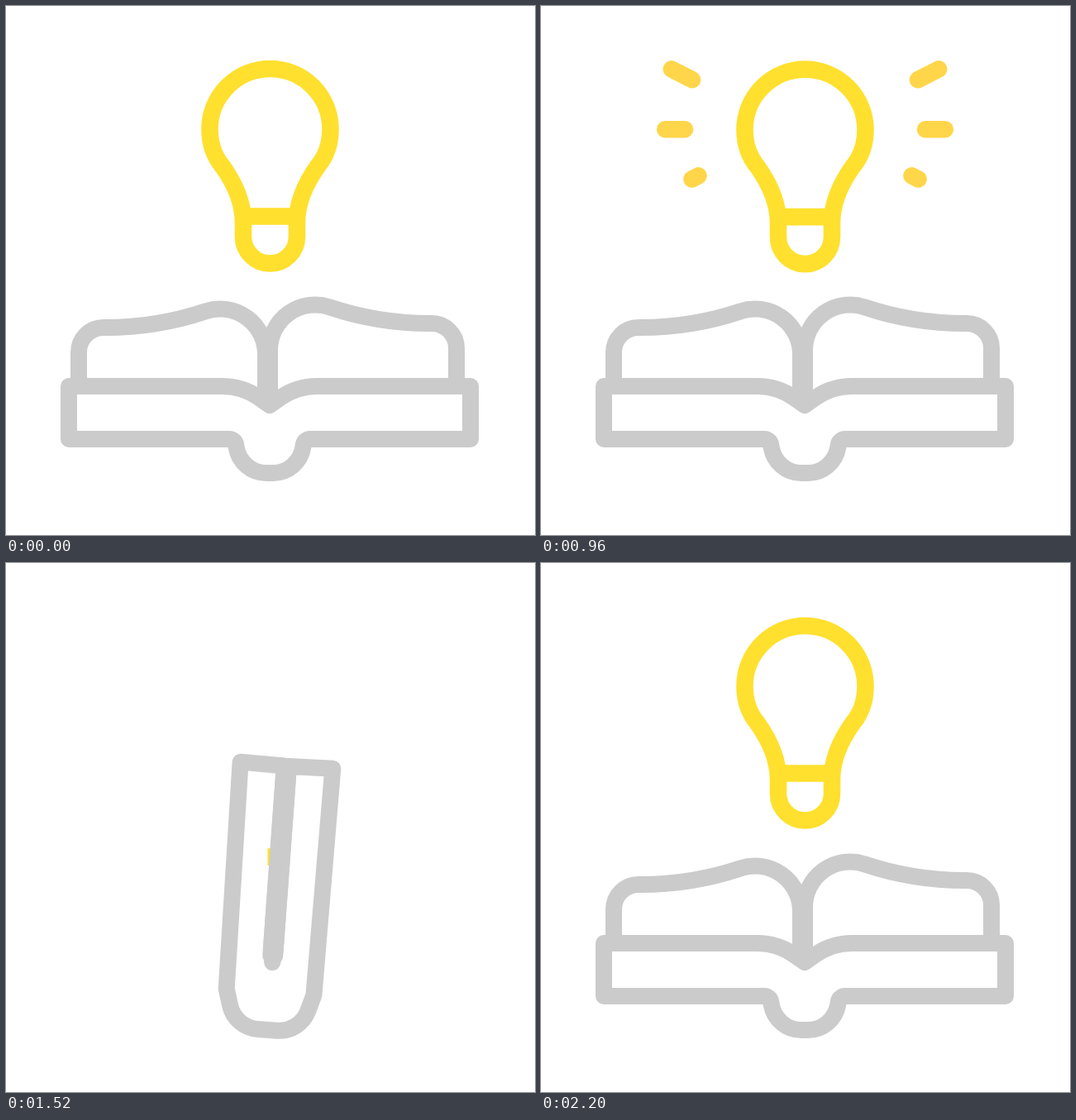
These frames come from a looping animation (640 by 640 pixels, 2.4 s). An HTML page with a canvas:

```html
<!DOCTYPE html>
<html lang="en">
<head>
<meta charset="utf-8">
<title>Idea book</title>
<style>
html, body { margin: 0; width: 100%; height: 100%; overflow: hidden; background: #fff; }
canvas { display: block; width: 640px; height: 640px; }
</style>
</head>
<body>
<canvas id="stage" width="640" height="640"></canvas>
<script>
const ctx = document.getElementById('stage').getContext('2d');
const GREY = '#cbcbcb', YELLOW = '#ffe02e', AMBER = '#ffd64a';
const LOOP = 2400, STEP = 40, LAST = 2200;
const MID = 319.5, SPINE_X = 319, SPINE_Y = 527;
const HALF = 0.25;

const clamp = v => Math.max(0, Math.min(1, v));
const lerp = (a, b, k) => a + (b - a) * k;
const span = (t, from, to) => (t - from) / (to - from);
const ease = v => (1 - Math.cos(Math.PI * clamp(v))) / 2;
const rad = deg => deg * Math.PI / 180;

// Right half of the cover, relative to the spine: open, half open, closed, corner radius.
const coverHalf = [
  [[33, -67], [31, -64], [2.4, -57], 77],
  [[243, -67], [220, -157.5], [2.6, -282], 0],
  [[243, -3], [246.5, -98], [56, -283], 0],
  [[42, -3], [41, 0], [53, -8], 8],
  [[35, 38], [37, 38], [39.5, 38], 37]
];

// Polyline of [x, y, radius] with rounded corners.
function rounded(pts) {
  const path = new Path2D();
  path.moveTo(pts[0][0], pts[0][1]);
  for (let i = 1; i < pts.length - 1; i++) {
    const [x, y, r] = pts[i];
    if (r) path.arcTo(x, y, pts[i + 1][0], pts[i + 1][1], r);
    else path.lineTo(x, y);
  }
  const end = pts[pts.length - 1];
  path.lineTo(end[0], end[1]);
  return path;
}

// Blend two points by angle and distance around the hinge.
function swing([x0, y0], [x1, y1], k) {
  const hinge = -27;
  const a = lerp(Math.atan2(y0 - hinge, x0), Math.atan2(y1 - hinge, x1), k);
  const r = lerp(Math.hypot(x0, y0 - hinge), Math.hypot(x1, y1 - hinge), k);
  return [r * Math.cos(a), hinge + r * Math.sin(a)];
}

function coverPath(lift) {
  const half = coverHalf.map(([open, mid, shut, r]) => {
    const [x, y] = lift < HALF ? swing(open, mid, lift / HALF) : swing(mid, shut, span(lift, HALF, 1));
    return [x, y, r];
  });
  const place = side => half.map(([x, y, r]) => [SPINE_X + side * x, SPINE_Y + y, r]);
  const valley = [SPINE_X, SPINE_Y - 44, 0];
  const path = rounded([valley, ...place(1), ...place(-1).reverse(), valley]);
  path.closePath();
  return path;
}

// A page turns rigidly with the cover and flattens as the book shuts.
function page(side, lift) {
  const extra = side > 0 ? 5 : 0;
  const flat = 1 - clamp(span(lift, HALF, 1));
  const a = rad(90 * lift), c = Math.cos(a), s = Math.sin(a);
  const x0 = 316.5 + 2.5 * lift + side * 2.5;
  const outline = [[226, 15, 0], [226, 86 + extra, 30], [131, 86 + extra, 380], [0, 130 + extra, 55], [0, 0, 0]];
  return outline.map(([x, h, r]) => [
    x0 + side * (x * c - h * flat * s),
    475 - (h * flat * c + x * s),
    r * flat
  ]);
}

function bulbTilt(t) {
  const max = 22.06;
  if (t < 285) return max * ease(t / 285);
  if (t < 571) return lerp(max, -max, ease(span(t, 285, 571)));
  return -max * (1 - ease(span(t, 571, 768)));
}

function bulbDrop(t) {
  return 279.5 * (ease(span(t, 948, 1348)) - ease(span(t, 1680, 2200)));
}

const bulb = new Path2D(
  'M287 279V262C287 240 279 218 262 194C251 181 246.5 166 246.5 149' +
  'A73 73 0 0 1 392.5 149C392.5 166 388 181 377 194C360 218 352 240 352 262V279' +
  'A32.5 32.5 0 0 1 287 279ZM287 254.5H352');

function drawBulb(t, left, right) {
  ctx.save();
  ctx.clip(rounded([...left, ...[...right].reverse(), [right[0][0], -10, 0], [left[0][0], -10, 0]]));
  ctx.translate(MID, 322 + bulbDrop(t));
  ctx.rotate(rad(bulbTilt(t)));
  ctx.translate(-MID, -322);
  ctx.lineWidth = 20.6;
  ctx.strokeStyle = YELLOW;
  ctx.stroke(bulb);
  ctx.restore();
}

// Three rays per side, fired from top to bottom.
function drawRays(t, start, colour) {
  ctx.lineWidth = 20.6;
  ctx.strokeStyle = colour;
  for (const slant of [-1, 0, 1]) {
    const age = t - start - (slant + 1) * 60;
    if (age <= 0 || age >= 270) continue;
    const inner = 145.5 - 16.5 * Math.abs(slant);
    const at = k => [inner + 32.7 * k, 149.2 + slant * lerp(56.2, 72.8, k)];
    const [hx, hy] = at(clamp(age / 125));
    const [tx, ty] = at(clamp(span(age, 116, 270)));
    for (const side of [-1, 1]) {
      ctx.beginPath();
      ctx.moveTo(MID + side * tx, ty);
      ctx.lineTo(MID + side * hx, hy);
      ctx.stroke();
    }
  }
}

function drawBook(lift, lean, left, right) {
  const rightPage = rounded(right);
  ctx.save();
  ctx.translate(MID, SPINE_Y);
  ctx.rotate(rad(lean));
  ctx.translate(-MID, -SPINE_Y);
  ctx.lineWidth = 20;
  ctx.strokeStyle = GREY;
  ctx.stroke(rounded(left));
  ctx.fill(rightPage);
  ctx.stroke(rightPage);
  ctx.stroke(coverPath(lift));
  ctx.restore();
}

function draw(t) {
  // The book opens exactly as it shuts, mirrored in time.
  const fold = 1440 - Math.abs(t - 1440);
  const lift = ease(span(fold, 960, 1320));
  const lean = 4.86 * ease(span(fold, 1120, 1440));
  const left = page(-1, lift), right = page(1, lift);

  ctx.fillStyle = '#fff';
  ctx.fillRect(0, 0, 640, 640);
  ctx.lineCap = ctx.lineJoin = 'round';
  drawRays(t, 569, GREY);
  drawRays(t, 809, AMBER);
  drawBulb(t, left, right);
  drawBook(lift, lean, left, right);
}

const begin = performance.now();
function tick() {
  const t = (performance.now() - begin) % LOOP;
  draw(Math.min(LAST, Math.floor(t / STEP) * STEP));
  requestAnimationFrame(tick);
}
tick();
</script>
</body>
</html>
```
